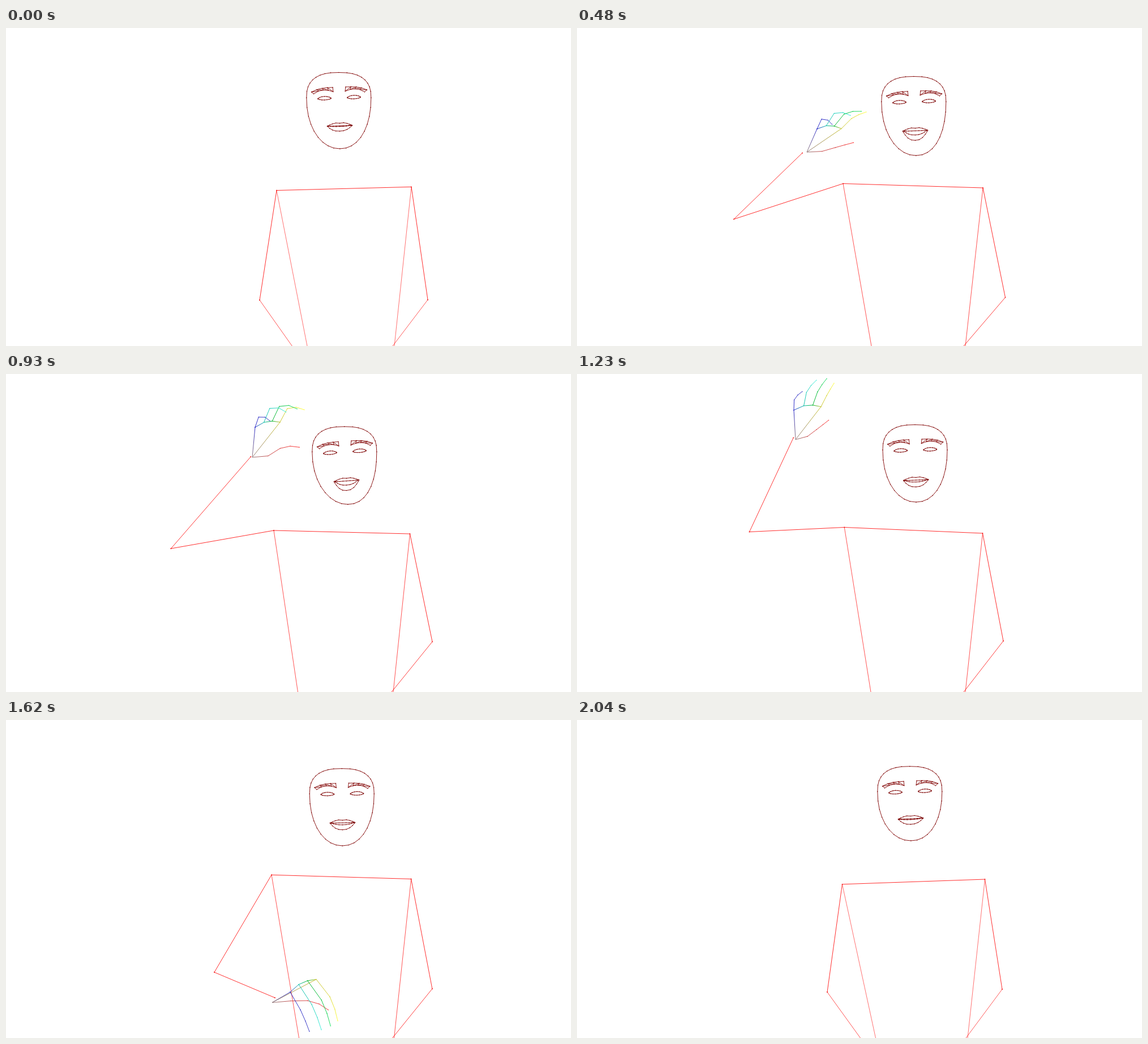
An HTML page with a canvas for the animation above (2070 ms loop, 998 px wide and 561 px high).

```html
<!DOCTYPE html>
<html lang="en">
<head>
<meta charset="utf-8">
<title>Waving figure</title>
<style>
html, body { margin: 0; width: 100%; height: 100%; overflow: hidden; background: #fff; }
canvas { display: block; width: 998px; height: 561px; }
</style>
</head>
<body>
<canvas id="stage" width="998" height="561"></canvas>
<script>
const LOOP = 2070, STEP = 30, FLOOR = 561;
const ctx = document.getElementById('stage').getContext('2d');

// Key poses: [time, ...values], joined by smooth curves
// left shoulder x y, right shoulder x y, right elbow x y, hips' x at the floor
const torso = [
  [0, 478, 286.5, 716, 280.3, 745, 479.5, 532, 686],
  [480, 470, 274.5, 717, 282, 756.5, 475.3, 520, 686],
  [930, 473, 276, 713.5, 282, 753, 472.3, 515.5, 684],
  [1230, 472.3, 270.5, 716.5, 281, 753, 471, 519, 686],
  [1470, 472, 260.7, 715.5, 279.7, 753, 472, 515.5, 685],
  [1800, 465.3, 289.8, 716, 281.5, 752.5, 476.5, 522, 687],
  [2040, 468.5, 289.8, 720.5, 281, 751, 475, 527.5, 690]
];
// elbow x y, wrist x y
const arm = [
  [0, 448, 480, 540, 610],
  [90, 439, 476, 536, 598],
  [480, 277, 337.3, 398, 220.5],
  [930, 291.3, 308, 432.3, 146],
  [1110, 299, 284, 390, 106],
  [1230, 304.5, 278.5, 382.3, 112.3],
  [1470, 296.7, 338, 407, 238.5],
  [1620, 368, 445, 475, 490],
  [1800, 430.7, 481.3, 535, 609],
  [2040, 442, 480, 536, 610]
];
// offset from wrist x y; thumb length and three angles;
// then for index and little finger: knuckle x y, bone length, angle, curl
const open = [3.7, 3.4, 22, -15, -37, -38, 45, -58, 22, -63, 3, -3, -52, 18, -88, 34];
const hand = [
  [480, 8, -1.5, 27, -3, -16, -15, 61, -41.5, 25, -45, 17, 18, -41, 19, -65, 74],
  [930, 2.7, 1, 28, -5, -32, 7, 49, -62, 27, -62, 53, 5, -53, 19, -71, 72],
  [1110, ...open],
  [1230, ...open],
  [1470, -5, 8.5, 33, -5, -1, 33, 78, -41, 39, 52, 16, 32, -18.5, 36, 60, 6]
];
// eye line centre x y, chin depth, tilt, chin shift, mouth depth, mouth opening
const head = [
  [0, 588.5, 123, 90, -2, 2, 49.5, 1.2],
  [480, 595.5, 130, 95, -2, 4, 51.2, 7.5],
  [930, 598.5, 137.3, 92.7, -3.5, 6, 51.2, 7.5],
  [1230, 597.7, 134, 92, -2, 2, 53, 3.5],
  [1470, 597, 132, 92, -2, 3, 52.2, 3],
  [1800, 589.7, 128, 91, 0, -1.5, 49.5, 4.5],
  [2040, 588.5, 126.3, 86.7, -2.5, 2, 47.7, 1.7]
];

const WRIST = [150, 125, 125];
const THUMB = [[200, 80, 80], [255, 60, 60]];
const FINGERS = [
  [[200, 195, 50], [255, 255, 70]],
  [[10, 180, 50], [40, 225, 110]],
  [[20, 190, 170], [70, 240, 220]],
  [[45, 45, 200], [70, 70, 200]]
];

// Monotone cubic through the rows of a track
function sample(track, t) {
  const last = track.length - 1;
  if (t <= track[0][0]) return track[0].slice(1);
  if (t >= track[last][0]) return track[last].slice(1);
  let i = 0;
  while (track[i + 1][0] <= t) i++;
  const rate = (j, k) => (track[j + 1][k] - track[j][k]) / (track[j + 1][0] - track[j][0]);
  const slope = (j, k) => {
    if (j === 0) return rate(0, k);
    if (j === last) return rate(last - 1, k);
    const a = rate(j - 1, k), b = rate(j, k);
    return a * b > 0 ? 2 * a * b / (a + b) : 0;
  };
  const span = track[i + 1][0] - track[i][0], s = (t - track[i][0]) / span;
  return track[i].map((a, k) => a + (track[i + 1][k] - a) * s * s * (3 - 2 * s)
    + span * s * (1 - s) * (slope(i, k) * (1 - s) - slope(i + 1, k) * s)).slice(1);
}

const range = (n, fn) => Array.from({ length: n }, (_, i) => fn(i));
const lerp = (a, b, s) => a + (b - a) * s;
const mix = (a, b, s) => a.map((v, i) => lerp(v, b[i], s));
const rgb = c => `rgb(${c.map(Math.round)})`;
const red = a => `rgba(255,0,0,${a})`;
const bend = (v, n) => Math.sign(v) * Math.abs(v) ** (2 / n);

function dot([x, y], r, color) {
  ctx.fillStyle = color;
  ctx.beginPath();
  ctx.arc(x, y, r, 0, 7);
  ctx.fill();
}

function line(points, color, closed) {
  ctx.strokeStyle = color;
  ctx.beginPath();
  points.forEach(p => ctx.lineTo(...p));
  if (closed) ctx.closePath();
  ctx.stroke();
}

function mesh(points, closed) {
  line(points, '#800000', closed);
  points.forEach(p => dot(p, .75, '#780000'));
}

function drawBody(t) {
  const [lx, ly, rx, ry, ex, ey, hl, hr] = sample(torso, t);
  const [ax, ay, wx, wy] = sample(arm, t);
  const L = [lx, ly], R = [rx, ry], A = [ax, ay], E = [ex, ey], W = [wx, wy];
  const raised = wy < FLOOR ? .12 : 0;
  line([L, [hl, FLOOR]], red(.56 + raised));
  line([R, [hr, FLOOR]], red(.56 + raised));
  line([E, [hr - 3, FLOOR]], red(.65 + raised));
  line([A, W], red(.68 + raised));
  line([A, L, R, E], red(.82));
  [L, R, A, E, W].forEach(p => dot(p, .9, '#f01010'));
}

// Chain of bones from a start point; each bone is [length, angle in degrees]
function chain(start, bones) {
  const points = [start];
  for (const [len, deg] of bones) {
    const [x, y] = points[points.length - 1], a = deg * Math.PI / 180;
    points.push([x + len * Math.cos(a), y + len * Math.sin(a)]);
  }
  return points;
}

function bone(p, q, from, to) {
  const g = ctx.createLinearGradient(...p, ...q);
  g.addColorStop(0, rgb(from));
  g.addColorStop(1, rgb(to));
  line([p, q], g);
  dot(q, .75, rgb(to));
}

function drawHand(t) {
  const [, , wx, wy] = sample(arm, t);
  if (wy > FLOOR) return;
  const [dx, dy, size, a, b, c, ...rest] = sample(hand, t);
  const wrist = [wx + dx, wy + dy];
  const index = rest.slice(0, 5), little = rest.slice(5);
  const nx = index[1] - little[1], ny = little[0] - index[0], n = Math.hypot(nx, ny);

  const thumb = chain(wrist, [[size, a], [size * .9, b], [size * .65, (b + c) / 2], [size * .58, c]]);
  thumb.slice(1).forEach((p, i) => bone(thumb[i], p,
    i ? mix(...THUMB, (i - 1) / 3) : WRIST, mix(...THUMB, i / 3)));

  const fingers = [0, .29, .62, 1].map(s => {
    const [kx, ky, len, angle, curl] = mix(index, little, s), arch = Math.sin(Math.PI * s);
    const l = len + 5 * arch, lift = 5.8 * arch / n;
    return chain([wrist[0] + kx + nx * lift, wrist[1] + ky + ny * lift],
      [[l, angle], [l * .6, angle + curl], [l * .55, angle + curl * 1.5]]);
  });
  fingers.forEach((f, i) => {
    const [from, to] = FINGERS[i];
    if (i % 3 === 0) bone(wrist, f[0], WRIST, from);
    if (i) bone(fingers[i - 1][0], f[0], FINGERS[i - 1][0], from);
    for (let k = 0; k < 3; k++) bone(f[k], f[k + 1], mix(from, to, k / 3), mix(from, to, (k + 1) / 3));
  });
}

function drawHead(t) {
  const [cx, cy, depth, tilt, chin, mouthY, gap] = sample(head, t);

  mesh(range(36, i => {
    const a = i * Math.PI / 18, s = Math.sin(a), n = s < 0 ? 2.55 : 2.12;
    const v = bend(s, n);
    return [cx - .7 + 57 * bend(Math.cos(a), n) + (v > 0 ? chin * v * v : 0),
      cy + v * (v < 0 ? 44.5 : depth)];
  }), true);

  for (const side of [-1, 1]) {
    const place = (x, y) => {
      const dx = side * (26 - x);
      return [cx + dx, cy + y + tilt * dx / 52];
    };
    const top = range(5, i => place(-23 + 9.4 * i, -18.6 + 6.6 * (1 - i / 4) ** 3));
    const low = range(5, i => place(-19 + 8.6 * i, -15.2 + 6.7 * (1 - i / 4) ** 4 + 4.2 * (i / 4) ** 4));
    mesh(top);
    mesh(low);
    top.forEach((p, i) => {
      line([p, low[i]], '#800000');
      if (i < 4) line([p, low[i + 1]], '#800000');
    });
    mesh(range(16, i => {
      const a = i * Math.PI / 8, s = Math.sin(a);
      return place(-11.8 * Math.cos(a), .5 - bend(s, 1.4) * (s > 0 ? 3.8 : 2.5));
    }), true);
  }

  const lip = (half, shape) => mesh(range(11, i => {
    const u = Math.sin((i - 5) * Math.PI / 10);
    return [cx + chin / 2 + half * u, cy + mouthY + tilt * u * .4 + shape(u)];
  }));
  const bowl = h => u => h * (1 - Math.abs(u) ** 2.5);
  lip(22, u => -5.7 * (1 - u * u) + 1.2 * Math.exp(-40 * u * u));
  lip(22, bowl(8 + 1.2 * gap));
  lip(20, bowl(.2));
  lip(20, bowl(gap));
}

function frame(now) {
  const t = Math.floor(now % LOOP / STEP) * STEP;
  ctx.fillStyle = '#fff';
  ctx.fillRect(0, 0, 998, FLOOR);
  ctx.lineWidth = 1;
  drawBody(t);
  drawHand(t);
  ctx.lineWidth = .9;
  drawHead(t);
}

const start = performance.now();
function tick() {
  frame(performance.now() - start);
  requestAnimationFrame(tick);
}
tick();
</script>
</body>
</html>
```
